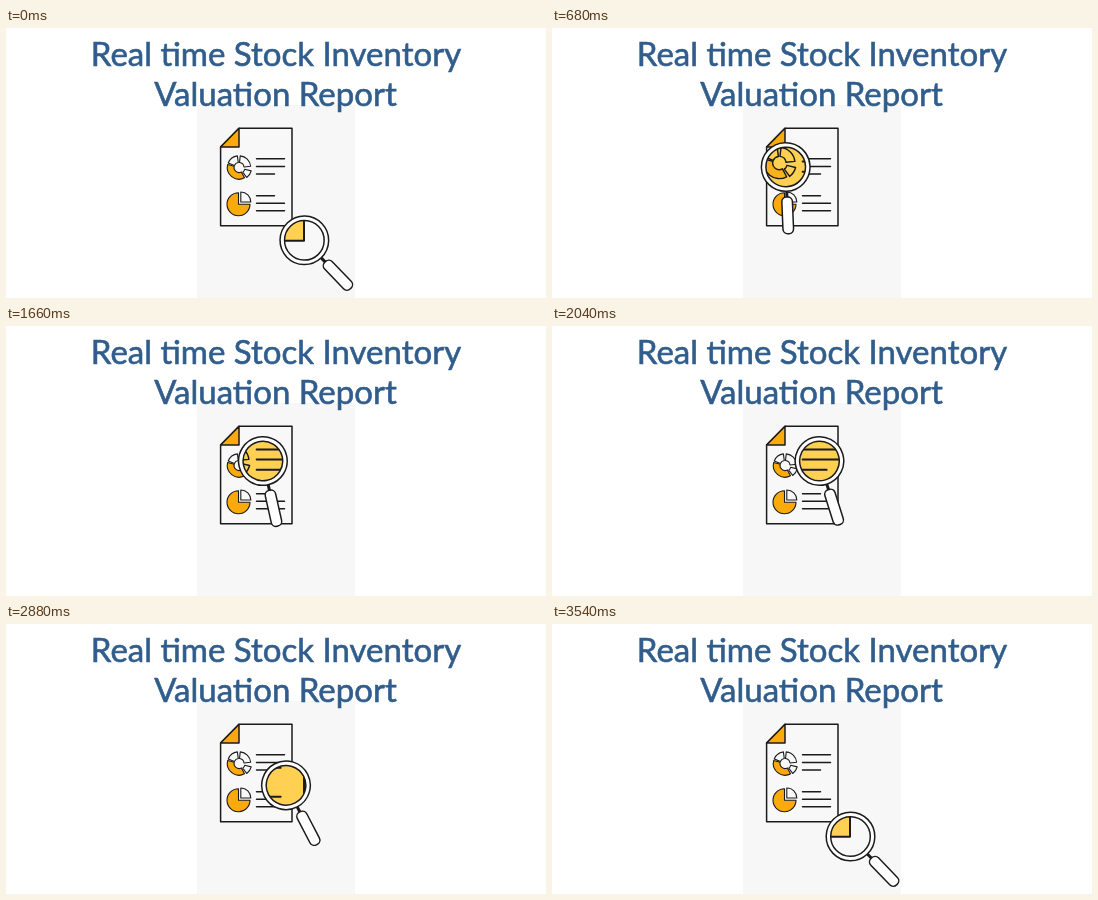
An HTML page for the animation above (3730 ms loop, 540x270 px).

```html
<!DOCTYPE html>
<html lang="en">
<head>
<meta charset="utf-8">
<title>Stock report</title>
<style>
  html, body { margin: 0; width: 100%; height: 100%; overflow: hidden; background: #fff; }
  svg { display: block; width: 540px; height: 270px; --paper: #f8f8f8; --accent: #fbaa0c; }
  text { font: 33px Lato, Carlito, sans-serif; fill: #305d8c; stroke: #305d8c; stroke-width: .6; text-anchor: middle; }
  .ink { stroke: #1b1a1c; stroke-width: 1.5; stroke-linejoin: round; stroke-linecap: round; }
  .paper { fill: var(--paper); }
  .accent { fill: var(--accent); }
  .thin { stroke-width: 1.1; }
  .neck { stroke-width: 3; }
  .magnified { --paper: #ffd052; --accent: #fbb01f; }
</style>
</head>
<body>
<svg viewBox="0 0 540 270">
  <defs>
    <clipPath id="glass"><circle id="glassShape" r="20"/></clipPath>
    <g id="page" class="ink">
      <path class="paper" d="M233 100.3H286V197.8H214.6V119Z"/>
      <path class="accent" d="M233 100.3V119H214.6Z"/>
      <g id="donut" class="thin" transform="translate(233 139.5)"></g>
      <path class="accent thin" d="M232.5 164.8V176.3H244A11.5 11.5 0 1 1 232.5 164.8Z"/>
      <path class="paper thin" d="M234.8 164V174H244.8A10 10 0 0 0 234.8 164Z"/>
      <path d="M250.5 130.8h28m-28 7.6h28m-28 7.6h18M250.5 167.8h18m-18 7.5h28m-28 7.5h28"/>
    </g>
  </defs>
  <rect x="191" y="77" width="158" height="193" fill="#f7f7f7"/>
  <text x="270" y="38.3">Real time Stock Inventory</text>
  <text x="269.5" y="77.8">Valuation Report</text>
  <use href="#page"/>
  <g clip-path="url(#glass)">
    <rect x="191" y="77" width="158" height="193" fill="#f8f8f8"/>
    <use href="#page" class="magnified" transform="translate(250 153) scale(1.333) translate(-250 -153)"/>
  </g>
  <g id="lens" class="ink">
    <path class="neck" d="M0 25V31"/>
    <rect x="-5.3" y="30" width="10.6" height="36.8" rx="4.8" fill="#fff"/>
    <path fill="#fff" fill-rule="evenodd" d="M-24.3 0a24.3 24.3 0 1 0 48.6 0a24.3 24.3 0 1 0-48.6 0M-19.8 0a19.8 19.8 0 1 0 39.6 0a19.8 19.8 0 1 0-39.6 0"/>
  </g>
</svg>
<script>
const LOOP = 3730;
const HOME = { x: 298.5, y: 212.5, angle: 44 };
const byId = id => document.getElementById(id);

function ringSegment(from, to, kind, shift = 0) {
  const at = (r, deg) => {
    const a = deg * Math.PI / 180;
    return `${r * Math.cos(a)} ${r * Math.sin(a)}`;
  };
  return `<path class="${kind}" transform="translate(${at(shift, (from + to) / 2)})" ` +
    `d="M${at(11.7, from)}A11.7 11.7 0 0 1 ${at(11.7, to)}` +
    `L${at(5, to)}A5 5 0 0 0 ${at(5, from)}Z"/>`;
}
byId("donut").innerHTML = ringSegment(62, 195, "accent") + ringSegment(203, 262, "paper") +
  ringSegment(276, 354, "paper") + ringSegment(14, 54, "paper", 1);

const progress = (t, start, length) => Math.min(1, Math.max(0, (t - start) / length));
const easeOut = u => u * (2 - u);
const easeInOut = u => (1 - Math.cos(Math.PI * u)) / 2;
const sineOut = u => Math.sin(Math.PI / 2 * u);
const mix = (a, b, u) => a + (b - a) * u;

// The lens flies onto the page, sweeps right across it, then flies home.
function draw() {
  const t = performance.now() % LOOP;
  const onPage = easeOut(progress(t, 0, 880)) * (1 - sineOut(progress(t, 2720, 730)));
  const sweep = easeInOut(progress(t, 600, 1750));
  const x = mix(HOME.x, mix(230, 270.5, sweep), onPage);
  const y = mix(HOME.y, 135, onPage);
  const angle = mix(HOME.angle, 19 * sweep, onPage);
  byId("glassShape").setAttribute("transform", `translate(${x} ${y})`);
  byId("lens").setAttribute("transform", `translate(${x} ${y}) rotate(${-angle})`);
  requestAnimationFrame(draw);
}
draw();
</script>
</body>
</html>
```
